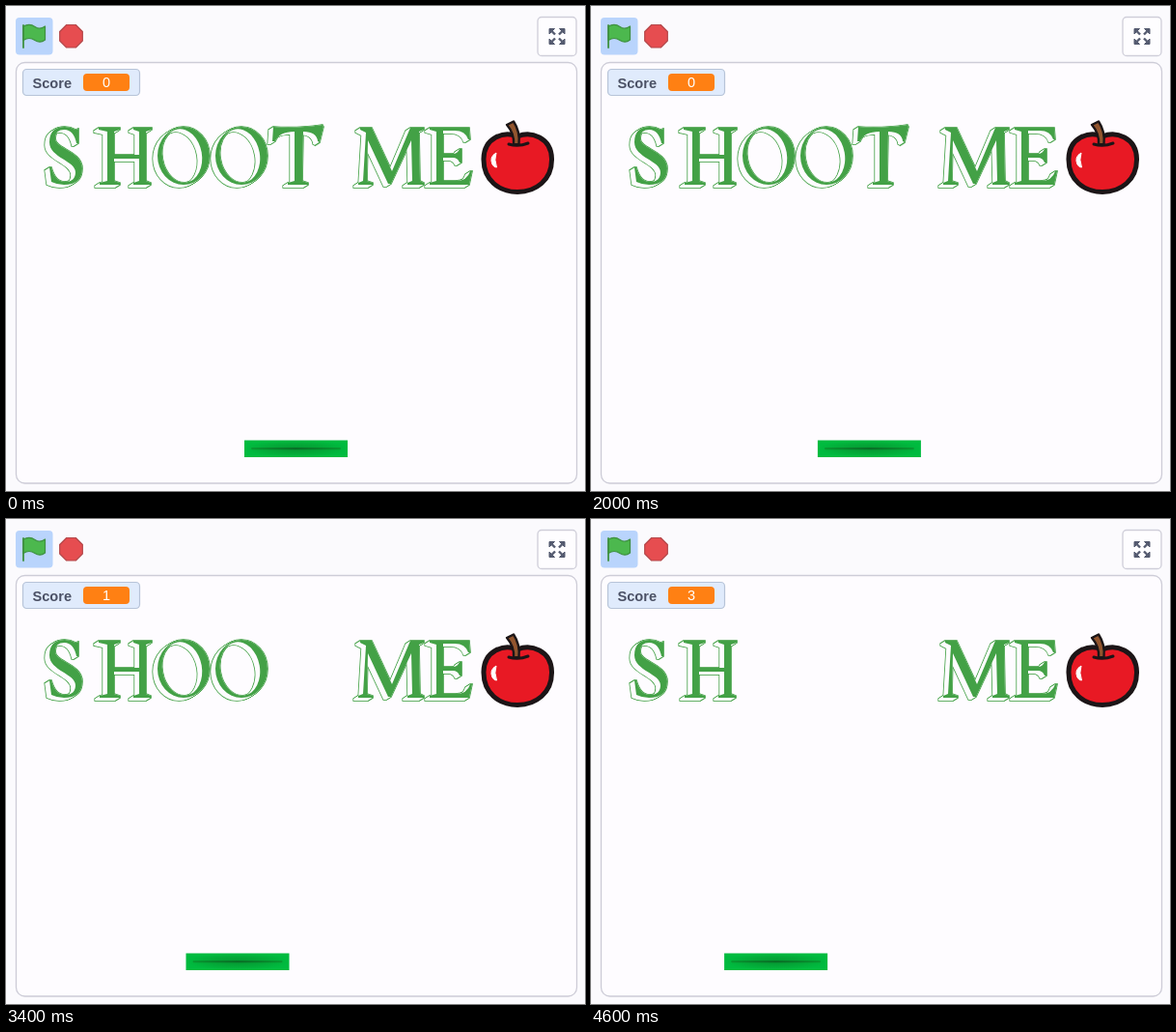
An HTML page for the animation above (4700 ms loop, 600 by 502 pixels).

```html
<!DOCTYPE html>
<html lang="en">
<head>
<meta charset="utf-8">
<title>Shoot me</title>
<style>
  html, body { margin: 0; width: 100%; height: 100%; overflow: hidden; background: #fbfafd; }
  svg { display: block; width: 600px; height: 502px; }
  text { font-family: "Liberation Sans", Arial, sans-serif; }
</style>
</head>
<body>
<svg viewBox="0 0 600 502">
  <defs>
    <radialGradient id="glow">
      <stop offset="0" stop-color="#059732"/>
      <stop offset=".55" stop-color="#04a938"/>
      <stop offset="1" stop-color="#00bb3f"/>
    </radialGradient>
    <linearGradient id="slot">
      <stop offset="0" stop-color="#079a31"/>
      <stop offset=".25" stop-color="#08822b"/>
      <stop offset=".5" stop-color="#087026"/>
      <stop offset=".75" stop-color="#08822b"/>
      <stop offset="1" stop-color="#079a31"/>
    </linearGradient>
  </defs>

  <!-- toolbar -->
  <rect x="10" y="12" width="38.5" height="38.5" rx="4" fill="#b9d4fc"/>
  <path d="M18 21Q24.500 17.500 30 21.500Q35 25 40.500 21V35Q35.500 39 30 35.500Q24 31.500 18 35.500Z" fill="#4cb84e" stroke="#3f9140" stroke-width="1.200" stroke-linejoin="round"/>
  <path d="M18 20V43" stroke="#3f9140" stroke-width="1.800" stroke-linecap="round"/>
  <path d="M62.700 19.500H72.300L79.300 26.500V36L72.300 43H62.700L55.700 36V26.500Z" fill="#e64d50" stroke="#b4484b" stroke-width="1.200" stroke-linejoin="round"/>
  <rect x="551" y="11.500" width="40" height="40" rx="4" fill="#fefdff" stroke="#cfced9" stroke-width="1.300"/>
  <g id="arrows" fill="#555b70" stroke="#555b70" stroke-linejoin="round"></g>

  <!-- stage -->
  <rect x="10.500" y="58.500" width="581" height="435.500" rx="9" fill="#fefcff" stroke="#cdccd7" stroke-width="1.300"/>
  <rect x="17.500" y="65.500" width="121" height="27" rx="4" fill="#e0ebfc" stroke="#b7c4d8" stroke-width="1.200"/>
  <text x="27.500" y="84.500" font-size="14.600" font-weight="700" fill="#4b5165">Score</text>
  <rect x="80" y="70" width="48" height="18" rx="4" fill="#ff8013"/>
  <text id="score" x="104" y="84" font-size="14.500" text-anchor="middle" fill="#fff">0</text>

  <g id="title" role="img" aria-label="SHOOT ME"></g>

  <!-- apple -->
  <path d="M530 135C544 129 565 136 565.500 158C566 180 549 192.500 530 192.500C511 192.500 494.500 180 495 158C495.500 136 516 129 530 135Z" fill="#e81924" stroke="#1c1517" stroke-width="5"/>
  <path d="M521 143Q531 146 541 142" fill="none" stroke="#1c1517" stroke-width="3" stroke-linecap="round"/>
  <path d="M519 123L526 119.500Q533 130 531.500 143L526 143.500Q527 132 519 123Z" fill="#92552e" stroke="#1c1517" stroke-width="2.400" stroke-linejoin="round"/>
  <path d="M508 152Q500.500 156 504 164Q506 167.500 508.500 167Q505.500 159 508 152Z" fill="#fff" stroke="#fff"/>

  <g id="paddle">
    <rect x="247" y="449.500" width="107" height="17.500" fill="url(#glow)"/>
    <rect x="254" y="457" width="93" height="2.200" rx="1.100" fill="url(#slot)"/>
  </g>
</svg>
<script>
const $ = id => document.getElementById(id);
const GREEN = '#43a146', PAPER = '#fefcff';
const LOOP = 4700, STEP = 12.1;

const ring = x => `M${x} 155a27 30 0 1 1 54 0a27 30 0 1 1 -54 0Z` +
  `m5.300 3.500a20.500 28 -10 1 1 40.400 -7a20.500 28 -10 1 1 -40.400 7Z`;

// Each letter: outline and the time at which it disappears
const letters = [
  ['M75 127V142H73Q70 128 60.500 128Q51 128 51 137C51 148 79 150 79 168Q79 185 60 185Q53 185 47 182L45 167H47Q51 182 61 182Q72 182 72 172C72 160 45 157 45 141Q45 125 61 125Q67 125 72 128Z'],
  ['M96 126H118V128L112 130V154H138V130L132 128V126H151V128L145 130V181L150 183V185H132V183L138 181V158H112V181L118 183V185H97V183L105 181V130L96 128Z'],
  [ring(157), 4400],
  [ring(217), 3500],
  ['M277 125Q300 127 328 123L329 125L325 141L323 140Q322 130 308 130L307 181L313 183V185H292V183L299 181V130Q283 130 279 140L276 140Z', 2800],
  ['M367 126H379L400 171L419 126H433V128L428 130L429 181L433 183V185H416V183L421 181L420 139L399 184H396L375 139L374 181L380 183V185H365V183L370 181L373 131L367 128Z'],
  ['M439 126H480L481 138H479Q476 129 465 129H453V153H463Q468 153 470 148H472V162H470Q468 157 463 157H453V181H466Q478 181 481 171H483L480 185H439V183L446 181V130L439 128Z']
];

// Outlined block sweeping down and left behind a solid face
function drawLetter([d]) {
  const sweep = style => Array.from({ length: 7 }, (_, i) =>
    `<path d="${d}" transform="translate(${-i * 0.8} ${i * 0.5})" fill-rule="evenodd" ${style}/>`).join('');
  return `<g>${sweep(`fill="none" stroke="${GREEN}" stroke-width="1.600"`)}` +
    `${sweep(`fill="${PAPER}"`)}<path d="${d}" fill="${GREEN}" fill-rule="evenodd"/></g>`;
}

$('title').innerHTML = letters.map(drawLetter).join('');
$('arrows').innerHTML = [[1, 1], [-1, 1], [1, -1], [-1, -1]].map(([x, y]) =>
  `<g transform="translate(571 31.500) scale(${x} ${y})"><path d="M2 2L6 6" stroke-width="2.400"/>` +
  `<path d="M8 2.500V8H2.500Z"/></g>`).join('');

// Paddle keys: time, position in steps from the start
const keys = [[0, 0], [900, 8], [1400, -8], [2000, -1], [2200, 1], [2900, 1],
  [3000, -5], [3800, -5], [3900, -9], [LOOP, -9]];

function paddleAt(t) {
  const i = keys.findIndex(k => k[0] > t);
  const [t0, a] = keys[i - 1], [t1, b] = keys[i];
  return Math.round(a + (b - a) * (t - t0) / (t1 - t0)) * STEP;
}

const shapes = $('title').children;
const start = performance.now();

function draw() {
  const now = Math.max(0, performance.now() - start) % LOOP;
  const t = Math.floor(now / 100) * 100;
  let hits = 0;
  letters.forEach(([, gone], i) => {
    const hit = t >= gone;
    shapes[i].style.display = hit ? 'none' : '';
    hits += hit;
  });
  $('score').textContent = hits;
  $('paddle').setAttribute('transform', `translate(${paddleAt(t)} 0)`);
  requestAnimationFrame(draw);
}
draw();
</script>
</body>
</html>
```
